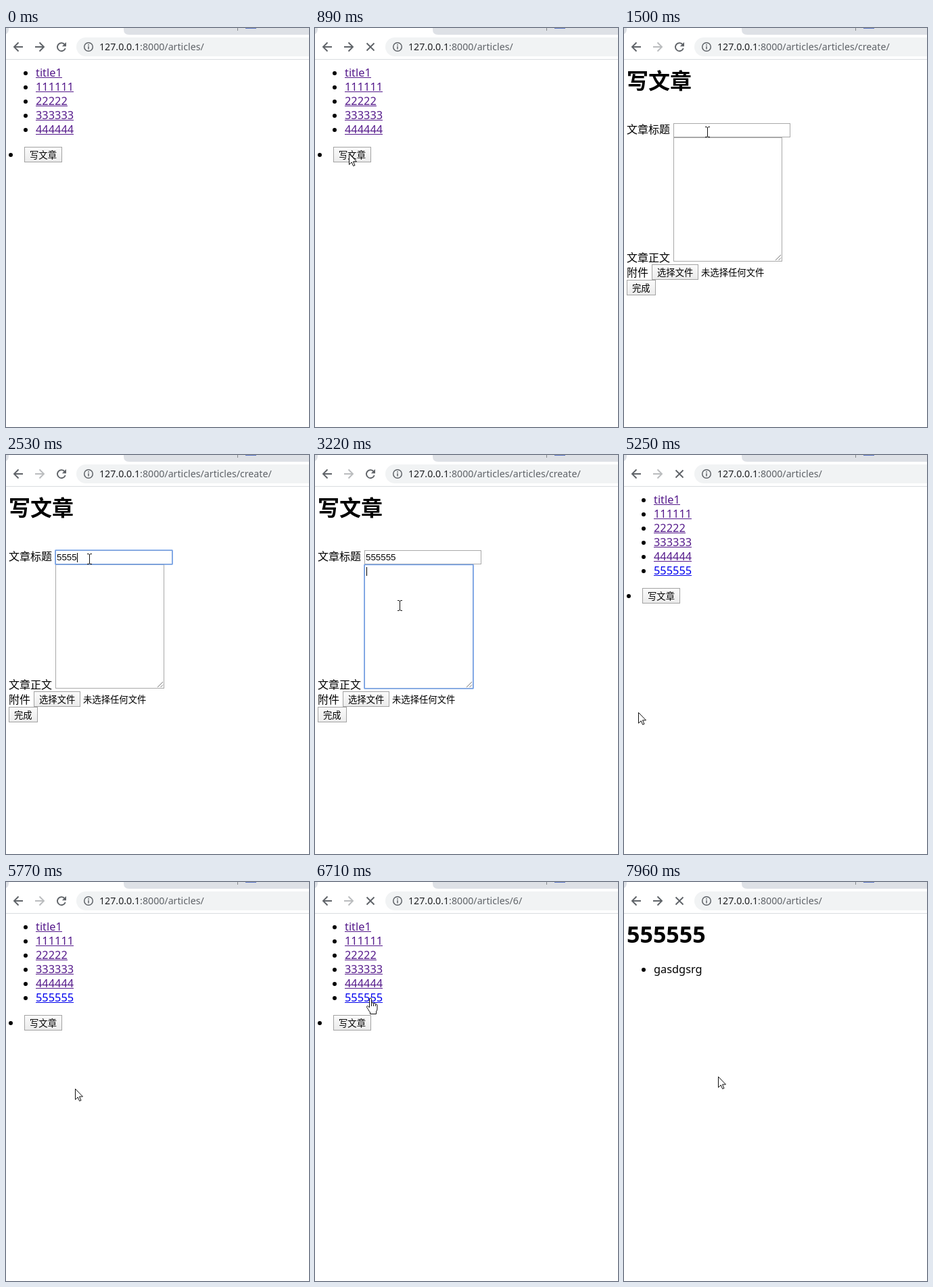
Recreate the animation shown at these times as an HTML page. Size 448 by 591 pixels, loop 8000 ms.

```html
<!DOCTYPE html>
<html lang="zh-CN">
<head>
<meta charset="utf-8">
<title>写文章</title>
<style>
html, body { margin: 0; width: 100%; height: 100%; overflow: hidden; background: #fff; }
svg { display: block; width: 100%; height: 100%; }
text { font: 16px "Noto Sans CJK SC", "Noto Sans CJK", sans-serif; white-space: pre; }
.latin { font: 16.35px "Noto Sans", "Open Sans", sans-serif; }
.url { font: 14.2px "Noto Sans", "Open Sans", sans-serif; fill: #5f6368; }
.small { font-size: 13.333px; }
.head { font-size: 32px; font-weight: 700; }
.num { font: 700 34px "Noto Sans", "Open Sans", sans-serif; }
.field { font: 13.333px "Liberation Sans", Arial, sans-serif; }
.area { font: 11.67px "Liberation Mono", monospace; }
.link { fill: #551a8b; }
.new { fill: #00e; }
.icon { fill: none; stroke: #5f6368; stroke-width: 1.9; }
.off { stroke: #babcbe; }
.box { fill: #fff; stroke: #a9a9a9; }
.ring { fill: none; stroke: #6f9ee9; stroke-width: 1.6; }
.btn rect { fill: url(#face); stroke: #a3a3a3; }
.point { fill: #fff; stroke: #111; stroke-linejoin: round; }
</style>
</head>
<body>
<svg viewBox="0 0 448 591" preserveAspectRatio="xMinYMin meet">
  <defs>
    <linearGradient id="face" x2="0" y2="1">
      <stop offset="0" stop-color="#fbfbfb"/>
      <stop offset="1" stop-color="#ebebeb"/>
    </linearGradient>
  </defs>

  <!-- browser bar -->
  <path d="M0 0H4V2Q4 7 0 9ZM174 0H448V10H182Q174 10 174 2Z" fill="#dee1e6"/>
  <path d="M342.5 0V4" stroke="#85888c"/>
  <rect x="354" width="16" height="1" fill="#5a74c4"/>
  <path d="M0 46.5H448" stroke="#dadce0"/>
  <rect x="104" y="14" width="380" height="28" rx="14" fill="#f1f3f4"/>
  <path class="icon" d="M25 28H12.5M18.5 21.5L12 28L18.5 34.5"/>
  <path class="icon" data-on="0-1040 7640-8000" d="M43 28H55.5M49.5 21.5L56 28L49.5 34.5"/>
  <path class="icon off" data-on="1040-7640" d="M43 28H55.5M49.5 21.5L56 28L49.5 34.5"/>
  <g data-on="0-890 1120-5010 5390-6620 6870-7640">
    <path class="icon" d="M86.3 24A6 6 0 1 0 87.7 30"/>
    <path d="M89 21V27.2H82.8Z" fill="#5f6368"/>
  </g>
  <path class="icon" data-on="890-1120 5010-5390 6620-6870 7640-8000" d="M76.5 22.5L87.5 33.5M87.5 22.5L76.5 33.5"/>
  <circle class="icon" cx="122" cy="28" r="6.3" style="stroke-width:1.5"/>
  <path class="icon" d="M122 27V31.5M122 24.3V26" style="stroke-width:1.5"/>
  <text class="url" x="138" y="33"><tspan fill="#202124">127.0.0.1</tspan>:8000/articles/<tspan data-on="1040-5250">articles/create/</tspan><tspan data-on="6620-7640">6/</tspan></text>

  <!-- article list -->
  <g data-on="0-1040 5250-6790">
    <g id="list"></g>
    <g id="write">
      <circle cx="7" cy="188" r="3"/>
      <g class="btn">
        <rect x="27.5" y="176.5" width="55" height="22"/>
        <text class="small" x="35" y="193">写文章</text>
      </g>
    </g>
  </g>

  <!-- form -->
  <g data-on="1040-5250">
    <text class="head" x="4" y="90">写文章</text>
    <text x="4" y="156">文章标题</text>
    <rect class="box" x="73.5" y="141.5" width="172" height="20"/>
    <rect class="box" x="73.5" y="162.5" width="160" height="183"/>
    <path d="M224 344L232 336M228.5 344L232 340.5" stroke="#777"/>
    <rect class="ring" data-on="1580-3220" x="73" y="141" width="173" height="21" rx=".5"/>
    <rect class="ring" data-on="3220-5010" x="73" y="162.5" width="161" height="183.5" rx=".5"/>
    <text id="title" class="field" x="75" y="156"></text>
    <text id="body" class="area" x="76.5" y="177"></text>
    <path id="caret" stroke="#000"/>
    <text x="4" y="346">文章正文</text>
    <text x="4" y="368">附件</text>
    <g class="btn">
      <rect x="41.5" y="350.5" width="68" height="22"/>
      <text class="small" x="49" y="367">选择文件</text>
    </g>
    <text class="small" x="114" y="367">未选择任何文件</text>
    <g class="btn">
      <rect x="4.5" y="373.5" width="42" height="22"/>
      <text class="small" x="12" y="390">完成</text>
    </g>
  </g>

  <!-- article -->
  <g data-on="6790-8000">
    <text class="num" x="4" y="90">555555</text>
    <circle cx="29" cy="130" r="3"/>
    <text class="latin" x="44" y="135">gasdgsrg</text>
  </g>

  <!-- pointer -->
  <g id="pointer">
    <path class="point" data-on="130-1345 4380-6090 6865-8000" d="M.5 .5V16.3L4.2 12.8L6.7 18.4L9 17.4L6.5 11.9H11.5Z"/>
    <path data-on="1345-4380" d="M-3 -7.5H-1L.5 -6.5L2 -7.5H4M.5 -6.5V6.5M-3 7.5H-1L.5 6.5L2 7.5H4" fill="none" stroke="#111"/>
    <path class="point" data-on="6090-6865" d="M-1.5 14V1.5Q-1.5 0 0 0Q1.5 0 1.5 1.5V7.5Q1.8 6.5 3.2 6.7Q4.5 7 4.5 8.3Q5 7.3 6.2 7.6Q7.4 8 7.4 9.3Q8 8.6 9 9Q10 9.5 10 11V16Q10 18 8.5 20V23.5H-.5V21Q-2 19.5 -3.5 16.5L-5.5 13.5Q-6 12 -4.7 11.6Q-3.5 11.5 -1.5 14ZM1.5 7.5V12M4.5 8.3V12M7.4 9.3V12"/>
  </g>
</svg>
<script>
const LOOP = 8000, STEP = 77;
const $ = id => document.getElementById(id);

const titles = ["title1", "111111", "22222", "333333", "444444", "555555"];
$("list").innerHTML = titles.map((name, i) => {
  const y = 72 + 21 * i, fresh = i === 5;
  const w = Math.round(name.length * 9.35 - (i ? 0 : 17.3));
  return `<g ${fresh ? 'class="new" data-on="5250-6790"' : 'class="link"'}>
    <circle cx="29" cy="${y - 5}" r="3" fill="#000"/>
    <text class="latin" x="44" y="${y}">${name}</text>
    <rect x="44" y="${y + 1}" width="${w}" height="1"/></g>`;
}).join("");

const timed = [...document.querySelectorAll("[data-on]")].map(el => ({
  el, spans: el.dataset.on.split(" ").map(s => s.split("-").map(Number))
}));

// first step, last step, x, y of each pointer move
const moves = [
  [130, 650, 50, 186], [1040, 1420, 123, 154], [2830, 3140, 125, 223],
  [4380, 4440, 24, 424], [4520, 4520, 24, 398], [4600, 4840, 21, 381],
  [5620, 5760, 102, 306], [5840, 6170, 82, 172], [6790, 6940, 148, 304],
  [7950, 7950, 139, 288]
];

function pointerAt(t) {
  let x = 304, y = 444;
  for (const [from, to, tx, ty] of moves) {
    if (t < from) break;
    const n = Math.round((to - from) / STEP) + 1;
    const lin = t >= to ? 1 : (Math.floor((t - from) / STEP) + 1) / n;
    const k = Math.min(1, lin * (2 - lin));
    x += (tx - x) * k;
    y += (ty - y) * k;
  }
  return [Math.round(x), Math.round(y)];
}

// time of each key and the length of the text after it
const titleKeys = [[2040, 1], [2210, 2], [2360, 3], [2530, 4], [2680, 5], [2830, 6]];
const bodyKeys = [[3600, 4], [3750, 5], [3920, 7], [4070, 8]];

function typed(keys, t, start) {
  return keys.reduce((last, key) => t >= key[0] ? key : last, [start, 0]);
}

function draw(t) {
  for (const { el, spans } of timed)
    el.style.display = spans.some(([a, b]) => t >= a && t < b) ? "" : "none";

  const [x, y] = pointerAt(t);
  $("pointer").setAttribute("transform", `translate(${x} ${y})`);
  $("write").setAttribute("transform", `translate(0 ${t < 5250 ? 0 : 21})`);

  const [titleTime, titleLen] = typed(titleKeys, t, 1580);
  const [bodyTime, bodyLen] = typed(bodyKeys, t, 3220);
  $("title").textContent = "555555".slice(0, titleLen);
  $("body").textContent = "gasdgsrg".slice(0, bodyLen);

  const inBody = t >= 3220;
  const focused = t >= 1580 && t < 5010;
  const lit = (t - (inBody ? bodyTime : titleTime)) % 1000 < 500;
  const cx = Math.floor(inBody ? 76.5 + 7 * bodyLen : 75.5 + 7.41 * titleLen) + .5;
  $("caret").setAttribute("d", `M${cx} ${inBody ? 166 : 145}v${inBody ? 13 : 14}`);
  $("caret").style.display = focused && lit ? "" : "none";
}

const begin = performance.now();
function tick() {
  draw((performance.now() - begin) % LOOP);
  requestAnimationFrame(tick);
}
tick();
</script>
</body>
</html>
```
